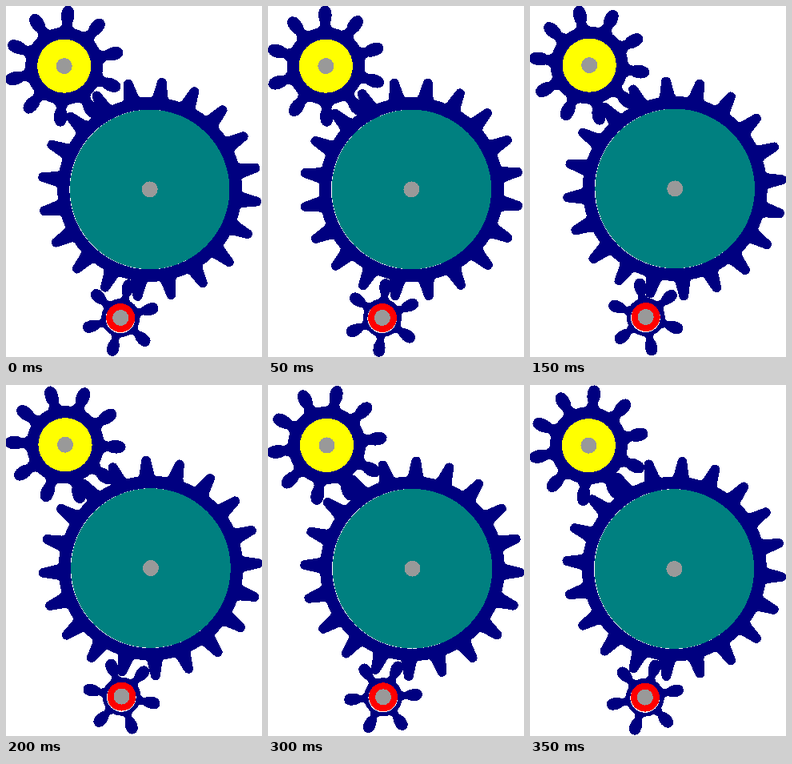
An HTML page for the animation above (400 ms loop, 320 px wide and 439 px high).

```html
<!DOCTYPE html>
<html lang="en">
<head>
<meta charset="utf-8">
<title>Gears</title>
<style>
  html, body { margin: 0; width: 100%; height: 100%; overflow: hidden; background: #fff; }
  svg { display: block; width: 100vw; height: 100vh; }
</style>
</head>
<body>
<svg viewBox="0 0 320 439" shape-rendering="crispEdges"><g id="train"></g></svg>
<script>
const STEP = 50, STEPS = 8;
const NAVY = '#000080', AXLE = '#999';

// start: angle of one tooth at time 0, in degrees clockwise from the top
// turn: degrees per step; gap: offset and radius of the white rim behind the disc
const gears = [
  { x: 179.7, y: 229.4, teeth: 20, start: 6.5, turn: 2.25, body: 115.5, disc: 99.8, color: '#008080', gap: [-0.4, 0.1, 100],
    tooth: 'M-15-112Q-9.6-115-9-119L-6.3-133C-5.8-138-4-140.3 0-140.3C4-140.3 5.8-138 6.3-133L9-119Q9.6-115 15-112Z' },
  { x: 72.7, y: 75.1, teeth: 10, start: 4, turn: -4.9, body: 48.5, disc: 33.6, color: '#ff0',
    tooth: 'M-12-46Q-6.2-49-6.2-54C-9.6-60-9.6-75.7 0-75.7C9.6-75.7 9.6-60 6.2-54Q6.2-49 12-46Z' },
  { x: 143.2, y: 390, teeth: 6, start: 13.8, turn: -8, body: 24, disc: 18, color: '#f00', gap: [-0.2, 0.8, 18.4],
    tooth: 'M-9-21Q-4.4-24.5-4.4-28C-9.2-36-9.2-49 0-49C9.2-49 9.2-36 4.4-28Q4.4-24.5 9-21Z' }
];

// small wobble of the whole train, one offset per step
const wobble = [[0, 0], [-0.3, 0], [0.7, 0], [1.5, -1], [1.3, -0.4], [1, 0.2], [0.8, 0.3], [0.7, 0.6]];

const train = document.getElementById('train');
const circle = (x, y, r, fill) => `<circle cx="${x}" cy="${y}" r="${r}" fill="${fill}"/>`;

function wheelMarkup({ teeth, tooth, body }) {
  let markup = circle(0, 0, body, NAVY);
  for (let i = 0; i < teeth; i++) {
    markup += `<path d="${tooth}" fill="${NAVY}" transform="rotate(${i * 360 / teeth})"/>`;
  }
  return `<g class="wheel">${markup}</g>`;
}

function hubMarkup({ disc, color, gap }) {
  return (gap ? circle(...gap, '#fff') : '') + circle(0, 0, disc, color) + circle(0, 0, 10, AXLE);
}

const place = (gear, content) => `<g transform="translate(${gear.x} ${gear.y})">${content}</g>`;
train.innerHTML = gears.map(g => place(g, wheelMarkup(g))).join('') +
                  gears.map(g => place(g, hubMarkup(g))).join('');
const wheels = train.querySelectorAll('.wheel');

function draw() {
  const step = Math.floor(performance.now() / STEP) % STEPS;
  train.setAttribute('transform', `translate(${wobble[step]})`);
  gears.forEach((g, i) => wheels[i].setAttribute('transform', `rotate(${g.start + g.turn * step})`));
  requestAnimationFrame(draw);
}
draw();
</script>
</body>
</html>
```
